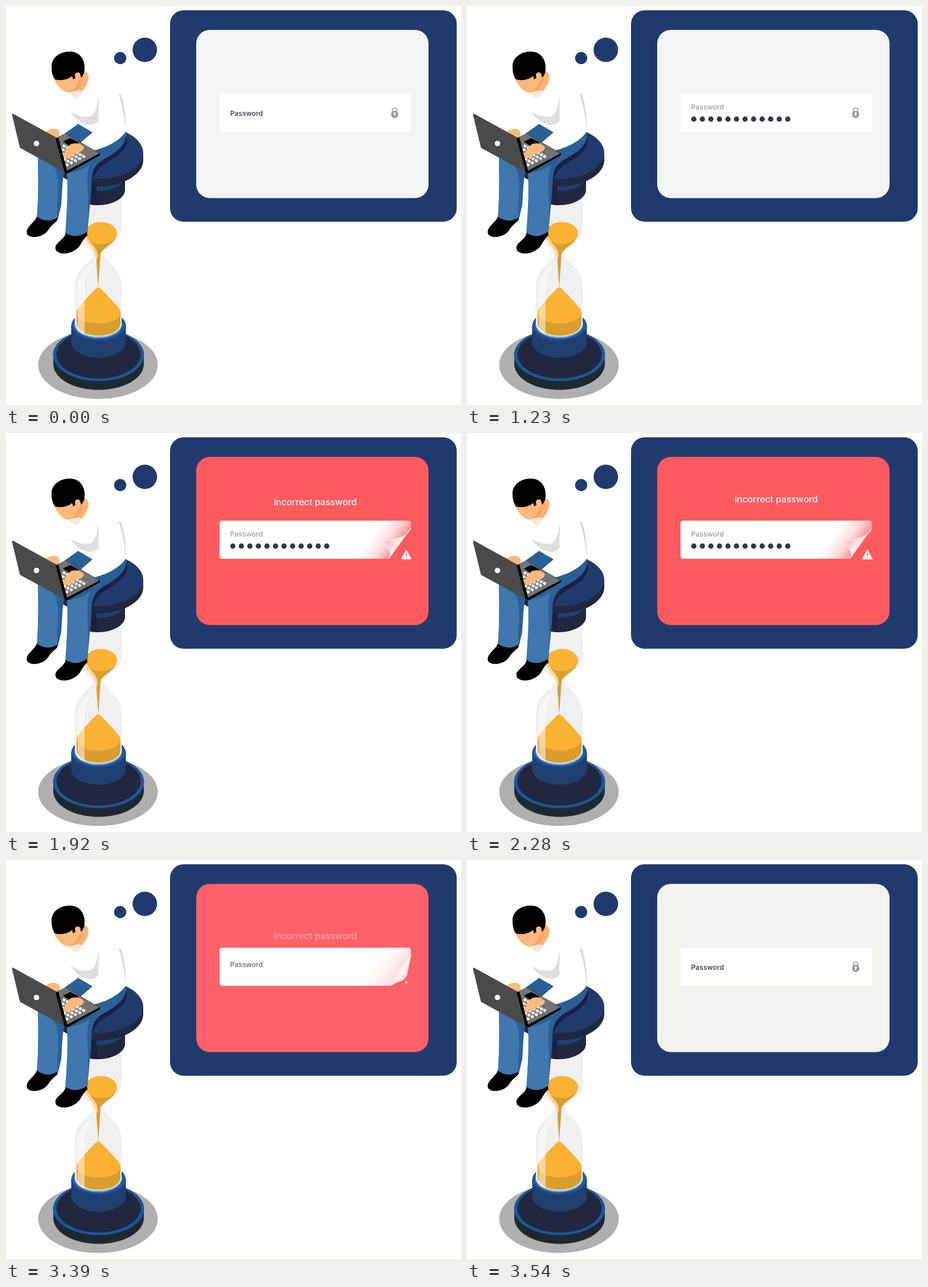
Write an HTML page that moves like this. It is 799 px wide and 701 px high and loops after 4.56 s.

```html
<!DOCTYPE html>
<html lang="en">
<head>
<meta charset="utf-8">
<title>Incorrect password</title>
<style>
html, body { margin: 0; width: 100%; height: 100%; overflow: hidden; background: #fff; }
svg { display: block; width: 100%; height: 100%; }
text { font-family: Inter, Roboto, sans-serif; font-weight: 500; }

.anim { animation: 4.56s linear infinite; }
#panel { fill: #f3f5f5; animation-name: panel; }
#label { font-size: 12.3px; fill: #2d3545; animation-name: label; }
#message { font-size: 15.8px; fill: #fff; animation-name: message; }
#dots { fill: #2f3848; animation-name: dots; }
#dots circle { opacity: 0; animation: dot 4.56s linear infinite; }
#ring { fill: none; stroke: #f3f5f5; animation-name: ring; }
#lock { animation-name: lock; }
#warn { transform-origin: 703px 214px; animation-name: warn; }
#shade { fill: url(#fade); animation-name: peel, shade; }
#card { fill: #fff; animation-name: peel; }
#flap { fill: url(#fold); stroke: #fff; stroke-width: .8; animation-name: flap; }

@keyframes panel {
  0%, 32.24% { fill: #f3f5f5; animation-timing-function: ease-in-out; }
  35.2%, 73.68% { fill: #ff5a60; }
  74.34% { fill: #ff6069; }
  77.63%, 100% { fill: #f2f3ee; }
}
@keyframes label {
  0%, 4.6% { transform: none; fill: #2d3545; animation-timing-function: ease-in-out; }
  9.87%, 71.71% { transform: translateY(-11px); fill: #979ca4; animation-timing-function: ease-in-out; }
  76.97%, 100% { transform: none; fill: #2d3545; }
}
@keyframes dots {
  0%, 4.5% { opacity: 0; }
  4.6%, 67.1% { opacity: 1; animation-timing-function: ease-in-out; }
  72.3%, 100% { opacity: 0; }
}
@keyframes dot {
  0% { opacity: 0; }
  1.4%, 70% { opacity: 1; }
  70.1%, 100% { opacity: 0; }
}
@keyframes ring {
  0%, 32.89% { r: 8px; stroke-width: 0; opacity: 1; }
  33.4% { r: 14px; stroke-width: 14px; }
  35.526% { r: 37px; stroke-width: 6px; }
  38.16%, 100% { r: 46px; stroke-width: 0; opacity: 0; }
}
@keyframes lock {
  0%, 35.6% { opacity: 1; }
  38.5%, 75% { opacity: 0; }
  77.4%, 100% { opacity: 1; }
}
@keyframes message {
  0%, 37.5% { transform: translateY(22px); opacity: 0; }
  42.1% { transform: translateY(6px); opacity: 1; animation-timing-function: ease-out; }
  50%, 69.7% { transform: none; opacity: 1; animation-timing-function: ease-in; }
  74.34% { transform: translateY(17px); opacity: .42; }
  76.5%, 100% { transform: translateY(22px); opacity: 0; }
}
@keyframes warn {
  0%, 37.5% { transform: scale(0); }
  42.1% { transform: scale(.97); animation-timing-function: ease-out; }
  48%, 70.4% { transform: none; animation-timing-function: ease-in-out; }
  74.34% { transform: scale(.28); }
  75.4%, 100% { transform: scale(0); }
}
@keyframes peel {
  0%, 32.9% { d: path("M380 154H706Q711 154 711 159L711 166L711 216Q711 221 706 221L674 221L380 221Q375 221 375 216V159Q375 154 380 154Z"); animation-timing-function: ease-out; }
  36%, 71% { d: path("M380 154H706Q711 154 711 159L711 168L698 186Q692.5 193.5 687 201L673 221L380 221Q375 221 375 216V159Q375 154 380 154Z"); animation-timing-function: ease-in-out; }
  77.6%, 100% { d: path("M380 154H706Q711 154 711 159L711 166L711 216Q711 221 706 221L674 221L380 221Q375 221 375 216V159Q375 154 380 154Z"); }
}
@keyframes shade {
  0%, 33% { opacity: 0; }
  35.526% { opacity: .12; }
  41%, 70.4% { opacity: 1; }
  74.34% { opacity: .3; }
  77%, 100% { opacity: 0; }
}
@keyframes flap {
  0%, 33% { opacity: 0; d: path("M711 166C711 180 711 195 711 205C711 212 711 218 706 221C700 221 690 221 685 221Q678 221 674 221Z"); }
  35.526% { opacity: .4; }
  38%, 71% { opacity: 1; d: path("M711 167C707 178 696 183 684 186C676 188 668 188 666 192C664 200 677 206 675 213Q674 219 672 221Z"); animation-timing-function: ease-in-out; }
  74.34% { opacity: .9; }
  77%, 100% { opacity: 0; d: path("M711 166C711 180 711 195 711 205C711 212 711 218 706 221C700 221 690 221 685 221Q678 221 674 221Z"); }
}
</style>
</head>
<body>
<svg viewBox="0 0 799 701" preserveAspectRatio="none">
  <defs>
    <linearGradient id="fade" gradientUnits="userSpaceOnUse" x1="653" y1="167" x2="692" y2="195">
      <stop offset="0" stop-color="#ff5a60" stop-opacity="0"/>
      <stop offset=".55" stop-color="#ff5a60" stop-opacity=".22"/>
      <stop offset="1" stop-color="#ff5a60" stop-opacity=".7"/>
    </linearGradient>
    <linearGradient id="fold" gradientUnits="userSpaceOnUse" x1="669" y1="188" x2="692" y2="204">
      <stop offset="0" stop-color="#ffb9bb"/>
      <stop offset=".6" stop-color="#ffe6e6"/>
      <stop offset="1" stop-color="#fff5f5"/>
    </linearGradient>
  </defs>

  <!-- hourglass base -->
  <ellipse cx="161.500" cy="630.500" rx="105" ry="60" fill="#afafaf"/>
  <path d="M83 613V629A79.500 45.500 0 0 0 242 629V613Z" fill="#20282f"/>
  <ellipse cx="162.500" cy="613" rx="80" ry="46" fill="#1c569c"/>
  <ellipse cx="162.500" cy="612" rx="74" ry="42.500" fill="#21273f"/>
  <path d="M114.500 562V591A48 27 0 0 0 210.500 591V562Z" fill="#1f3f70"/>
  <ellipse cx="162.500" cy="562" rx="48" ry="27" fill="#1c4985"/>
  <ellipse cx="162.500" cy="560" rx="47" ry="26" fill="#1f5ba3"/>
  <ellipse cx="162" cy="559" rx="42" ry="24.500" fill="#7fa6cd"/>

  <!-- glass and sand -->
  <path d="M121 338H203V392C203 416 172 424 171 437C171 449 203 458 203 492V558A41 23 0 0 1 121 558V492C121 458 153 449 153 437C152 424 121 416 121 392Z" fill="#f0f0f0"/>
  <path d="M124 536H201V558A38.500 21.500 0 0 1 124 558Z" fill="#d99e2e"/>
  <path d="M162 494C166 494 193 525 199 532Q201 535 201 539A38.500 19 0 0 1 124 539Q124 535 126 532C131 525 158 494 162 494Z" fill="#f9b233"/>
  <path d="M139 399H195C194 418 170 423 166 436L162 494L158 436C155 422 140 417 139 399Z" fill="#d99e2e"/>
  <ellipse cx="167" cy="399" rx="28" ry="19.500" fill="#f9b233"/>
  <path d="M140 398C143 415 162 423 161 440L159 447C158 426 141 420 137 402Z" fill="#fbd397"/>
  <path d="M126 570V492C126 474 140 463 153 454C145 467 138 476 138 492V577Q131 575 126 570Z" fill="#fff" opacity=".5"/>

  <!-- seat -->
  <path d="M114 300V323A47.500 27 0 0 0 209 323V300Z" fill="#20273f"/>
  <path d="M114 300A47.500 25 0 0 0 209 300Z" fill="#1d4077"/>
  <path d="M150 300H158L160 350L150 349Z" fill="#1d1f3c"/>
  <path d="M81 258V271A80 46 0 0 0 241 271V258Z" fill="#20273f"/>
  <ellipse cx="161" cy="258" rx="80" ry="46" fill="#213a6e"/>
  <path d="M212 231C217 257 183 270 168 281Q156 292 153 303Q120 305 97 288L110 258Z" fill="#1e1f45"/>

  <!-- legs -->
  <path d="M56 262L104 285C99 300 99 322 97 350L91 375Q70 383 54 375C57 340 57 305 56 262Z" fill="#2a6095"/>
  <path d="M56 264L82 280C93 292 93 320 90 350V374Q70 383 54 374C57 340 57 300 56 264Z" fill="#3f77ae"/>
  <path d="M103 224L127 207L165 212L211 221C213 244 195 256 174 268C154 279 150 290 150 320L143 397Q125 402 116 395L107 292L155 262L140 243Z" fill="#2a6095"/>
  <path d="M107 294C120 292 135 288 148 279C137 300 148 335 143 398Q124 408 104 401C107 360 109 325 107 294Z" fill="#3f77ae"/>
  <path d="M54 370Q72 383 90 372V377C83 383 78 387 74 394C68 403 53 408 43 405Q34 402 37 393C41 384 51 379 54 370Z"/>
  <path d="M105 399Q123 410 142 397L143 403C136 409 134 414 129 422C121 432 106 437 95 434Q85 431 87 422C91 413 102 410 105 399Z"/>

  <!-- torso -->
  <path d="M113 185L128 208L152 222L131 240L137 258C166 252 195 243 211 220L210 190L199 155L165 150L125 155Z" fill="#fff"/>
  <path d="M113 185C123 193 136 196 148 194C157 190 161 174 163 158C164 175 161 188 163 201Q158 208 149 209C137 209 122 201 113 185Z" fill="#dedede"/>
  <path d="M198 155L202 156C207 170 211 190 210 219C208 192 203 172 198 155Z" fill="#d9d9d9"/>

  <!-- head -->
  <path d="M111 151L133 147Q134 155 125 162Q115 161 111 151Z" fill="#fde8d8"/>
  <path d="M133 115Q143 113 145 123C145 135 138 145 133 150C126 146 118 151 109 152L118 130Z" fill="#fab374"/>
  <path d="M84 127C89 140 100 152 110 152C118 151 128 141 132 128L124 115Z" fill="#fdb97c"/>
  <path d="M110 152C119 149 125 140 127 132L135 126C134 137 130 144 123 148Z" fill="#f5a566"/>
  <path d="M80 108C79 91 94 80 112 80C130 80 139 95 138 110Q138 120 132 126L130 119C127 115 121 117 121 122L122 126L118 129L116 123C109 129 98 132 86 129C82 124 80 116 80 108Z"/>
  <ellipse cx="125.500" cy="122.500" rx="4" ry="5.500" fill="#fdb97c"/>

  <!-- laptop -->
  <path d="M67 222C75 217 84 213 92 218Q97 226 91 236Z" fill="#fdb97c"/>
  <path d="M92 230L104 224L165 259V262L108 294L100 289Z" fill="#090909"/>
  <path d="M90 231L104 224L164 259L106 290Z" fill="#737373"/>
  <path d="M100 238L113 232L128 240L114 248Z"/>
  <path id="keys" fill="none" stroke="#fff" stroke-width="4.500" stroke-dasharray="5 1.500"/>
  <path d="M97 265C105 258 106 245 116 242Q129 239 137 248C136 257 125 257 120 260C115 267 104 270 97 265Z" fill="#fdb97c"/>
  <path d="M107 290L165 259V262L108 294Z" fill="#090909"/>
  <path d="M12 189L90 232L107 292L101 291L26 250Q24 249 24 247L11 193Q10 189 12 189Z" fill="#4a4a4a"/>
  <path d="M87 232L92 231L108 292L103 292Z"/>
  <circle cx="53.500" cy="241.500" r="4.800" fill="#fff"/>

  <!-- thought bubble -->
  <g fill="#213a6d">
    <circle cx="200.500" cy="91.500" r="10.700"/>
    <circle cx="243.800" cy="77" r="21.500"/>
    <rect x="288" y="7.500" width="503.500" height="371.500" rx="24"/>
  </g>
  <rect id="panel" class="anim" x="334" y="42" width="408" height="295.500" rx="24"/>

  <text id="message" class="anim" x="543" y="121.500" text-anchor="middle">incorrect password</text>
  <path id="card" class="anim"/>
  <path id="shade" class="anim"/>
  <path id="flap" class="anim"/>
  <text id="label" class="anim" x="393.500" y="193">Password</text>
  <g id="dots" class="anim"></g>
  <g id="lock" class="anim">
    <path d="M678.500 187V183A4 4 0 0 1 686.500 183V187" fill="none" stroke="#979ca4" stroke-width="1.700"/>
    <circle cx="682.500" cy="190.500" r="6.400" fill="#979ca4"/>
    <path d="M682.500 187A1.800 1.800 0 0 1 683.500 190.400V193.500H681.500V190.400A1.800 1.800 0 0 1 682.500 187Z" fill="#fff"/>
  </g>
  <circle id="ring" class="anim" cx="683" cy="188.500" r="8" stroke-width="0"/>
  <g id="warn" class="anim">
    <path d="M703 206.500L711 221H695Z" fill="#fff" stroke="#fff" stroke-width="2" stroke-linejoin="round"/>
    <path d="M703 211V216M703 218V219.800" stroke="#ff5a60" stroke-width="1.800"/>
  </g>
</svg>
<script>
const dots = document.getElementById('dots');
for (let i = 0; i < 12; i++) {
  const dot = document.createElementNS('http://www.w3.org/2000/svg', 'circle');
  dot.setAttribute('cx', 398.3 + 15 * i);
  dot.setAttribute('cy', 198.7);
  dot.setAttribute('r', 4.6);
  // typing slows down towards the end
  dot.style.animationDelay = 220 + 36.7 * i + 4.35 * i * i + 'ms';
  dots.append(dot);
}

const rows = [.12, .24, .36, .48, .6].map(v => {
  const x = 102 + 61 * v, y = 284 - 31 * v;
  return `M${x} ${y}l-40 -21.300`;
});
document.getElementById('keys').setAttribute('d', rows.join(''));
</script>
</body>
</html>
```
